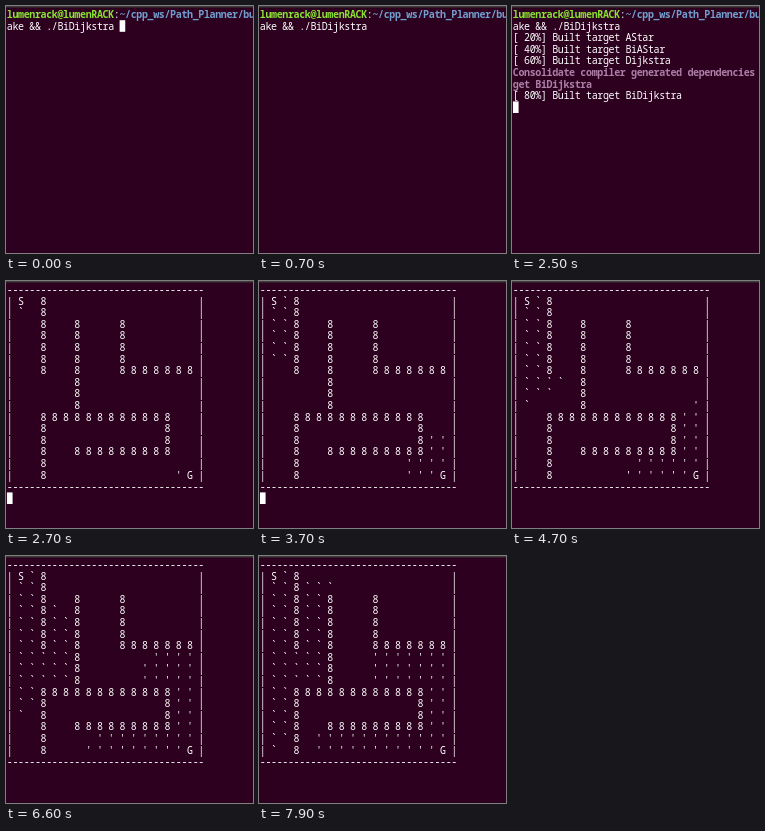
These frames come from a looping animation (247 px wide and 247 px high, 8 s). An HTML page with a canvas:

```html
<!DOCTYPE html>
<html lang="en">
<head>
<meta charset="utf-8">
<title>Bidirectional Dijkstra in a terminal</title>
<style>
  html, body { margin: 0; width: 100%; height: 100%; overflow: hidden; background: #2c001e; }
  canvas { display: block; }
</style>
</head>
<body>
<canvas id="term" width="247" height="247"></canvas>
<script>
const ctx = document.getElementById('term').getContext('2d');
const LOOP = 8000, STEP = 100, SIZE = 16;
const LEFT = 0.95, TOP = 2.6, CW = 5.633, LH = 11.6;
const WHITE = '#fff', GREEN = '#8ae234', BLUE = '#729fcf', PINK = '#ad7fa8';

// ---- terminal ----
function write(str, row, col = 0, color = WHITE, weight = 400) {
  ctx.fillStyle = color;
  ctx.font = `${weight} 10px "Noto Sans Mono", "DejaVu Sans Mono", monospace`;
  [...str].forEach((ch, i) => {
    if (ch !== ' ') ctx.fillText(ch, LEFT + (col + i + 0.5) * CW, TOP + row * LH + 9.3);
  });
}

function cursor(t, row, col = 0) {
  if (Math.floor((t + 6) / 600.5) % 2) return;
  ctx.fillStyle = WHITE;
  ctx.fillRect(LEFT + col * CW, TOP + row * LH, CW, LH);
}

// ---- maze ----
const walls = new Set();
const key = (x, y) => y * SIZE + x;
function wall(x0, y0, x1, y1) {
  for (let y = y0; y <= y1; y++)
    for (let x = x0; x <= x1; x++) walls.add(key(x, y));
}
wall(2, 0, 2, 6);
wall(5, 2, 5, 9);
wall(9, 2, 9, 6);
wall(9, 6, 15, 6);
wall(2, 10, 13, 10);
wall(2, 10, 2, 15);
wall(13, 10, 13, 13);
wall(5, 13, 13, 13);

// Dijkstra with diagonal moves: cells in the order they are closed
function search(sx, sy) {
  const open = [{ x: sx, y: sy, d: 0 }], closed = new Set(), order = [];
  while (open.length) {
    open.sort((a, b) => Math.abs(a.d - b.d) > 1e-6 ? a.d - b.d : b.y - a.y);
    const { x, y, d } = open.shift();
    if (closed.has(key(x, y))) continue;
    closed.add(key(x, y));
    order.push([x, y]);
    for (let dy = -1; dy <= 1; dy++)
      for (let dx = -1; dx <= 1; dx++) {
        const nx = x + dx, ny = y + dy;
        if (nx < 0 || ny < 0 || nx >= SIZE || ny >= SIZE) continue;
        if (!walls.has(key(nx, ny)) && !closed.has(key(nx, ny)))
          open.push({ x: nx, y: ny, d: d + Math.hypot(dx, dy) });
      }
  }
  return order.slice(1);
}
const fromStart = search(0, 0), fromGoal = search(15, 15);

const pauses = [4600, 5000, 7000, 7800], catchUps = [4700, 6100, 7100];
const passed = (times, t) => times.filter(s => s <= t).length;
const expanded = t => Math.floor((t - 2600) / STEP) - passed(pauses, t) + passed(catchUps, t);

function drawMaze(t) {
  const put = (ch, x, y) => write(ch, y + 1, 2 + 2 * x);
  const edge = '-'.repeat(2 * SIZE + 3);
  write(edge, 0);
  write(edge, SIZE + 1);
  for (let row = 1; row <= SIZE; row++) {
    write('|', row);
    write('|', row, 2 * SIZE + 2);
  }
  walls.forEach(k => put('8', k % SIZE, Math.floor(k / SIZE)));
  put('S', 0, 0);
  put('G', 15, 15);
  const n = expanded(t);
  fromStart.slice(0, n).forEach(([x, y]) => put('`', x, y));
  fromGoal.slice(0, n).forEach(([x, y]) => put("'", x, y));
  cursor(t, SIZE + 2);
}

// ---- shell and build ----
const build = [
  [2100, '[ 20%] Built target AStar'],
  [2200, '[ 40%] Built target BiAStar'],
  [2300, '[ 60%] Built target Dijkstra'],
  [2400, 'Consolidate compiler generated dependencies', PINK, 700],
  [2400, 'get BiDijkstra', PINK, 700],
  [2500, '[ 80%] Built target BiDijkstra']
];

function drawShell(t) {
  write('lumenrack@lumenRACK', 0, 0, GREEN, 700);
  write(':', 0, 19);
  write('~/cpp_ws/Path_Planner/bu', 0, 20, BLUE, 700);
  write('ake && ./BiDijkstra', 1);
  if (t < 2000) return cursor(t, 1, 20);
  const lines = build.filter(([at]) => at <= t);
  lines.forEach(([, str, color, weight], i) => write(str, i + 2, 0, color, weight));
  cursor(t, lines.length + 2);
}

function frame(now) {
  const t = Math.floor(now % LOOP / STEP) * STEP;
  ctx.textAlign = 'center';
  ctx.fillStyle = '#2c001e';
  ctx.fillRect(0, 0, 247, 247);
  ctx.fillStyle = '#3c3b37';
  ctx.fillRect(0, 0, 247, 1.5);
  (t < 2600 ? drawShell : drawMaze)(t);
  requestAnimationFrame(frame);
}
requestAnimationFrame(frame);
</script>
</body>
</html>
```
